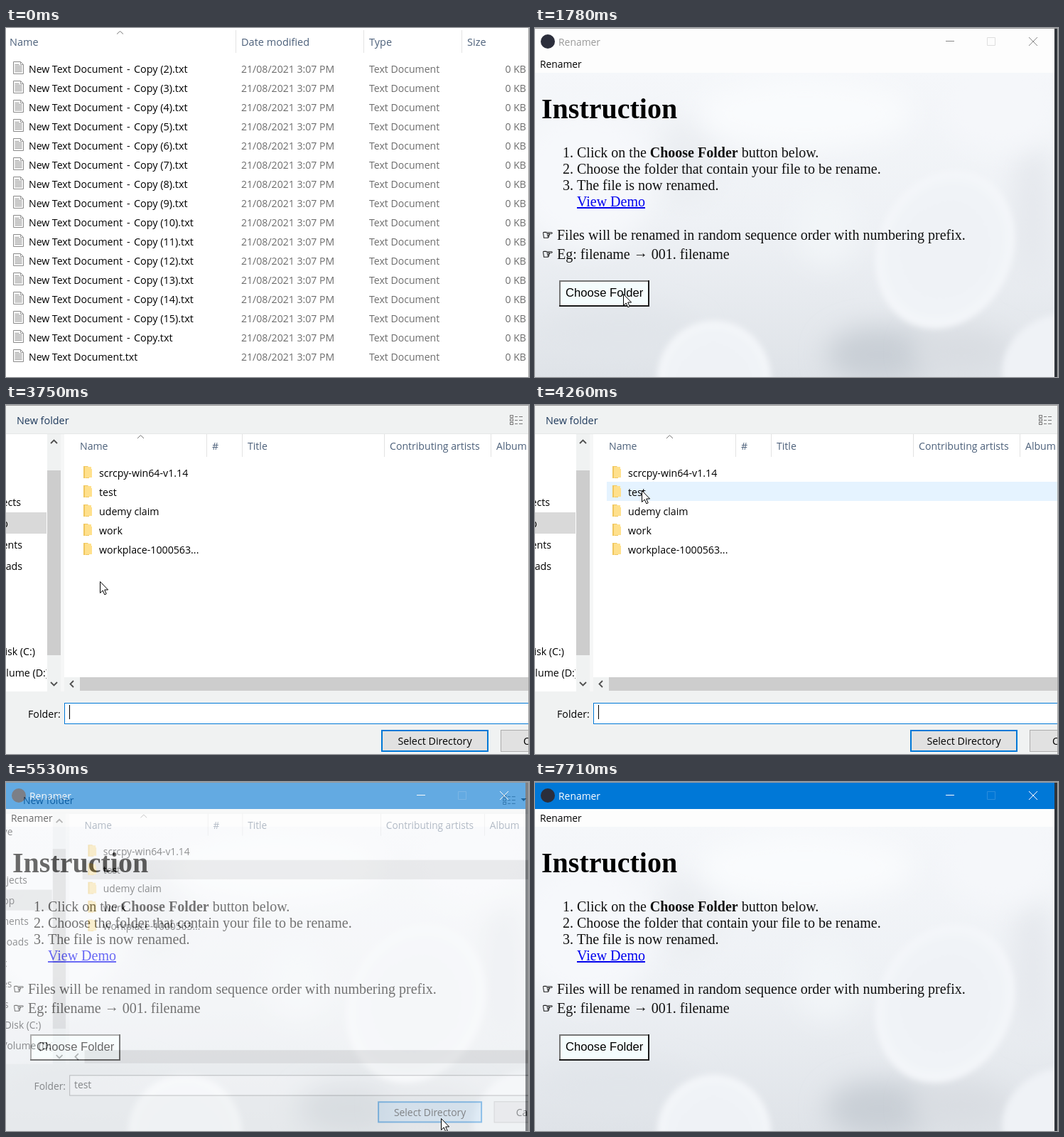
An HTML page for the animation above (8000 ms loop, 736 by 491 pixels).

```html
<!DOCTYPE html>
<html lang="en">
<head>
<meta charset="utf-8">
<title>Renamer</title>
<style>
html, body { margin: 0; width: 100%; height: 100%; overflow: hidden; background: #fff; }
svg { display: block; width: 736px; height: 491px; }
text { white-space: pre; }
.ui { font-family: "Open Sans", "Noto Sans", sans-serif; }
.serif { font-family: "Liberation Serif", serif; }
.sans { font-family: "Liberation Sans", sans-serif; }
.sym { font-family: "DejaVu Sans", sans-serif; }
#box .shade { filter: drop-shadow(0 5px 9px rgba(0,0,0,.5)); }
</style>
</head>
<body>
<svg id="stage" viewBox="0 0 736 491" xmlns="http://www.w3.org/2000/svg">
  <defs>
    <linearGradient id="sky" x1="0" y1="0" x2="0" y2="1">
      <stop offset="0" stop-color="#f5f7fa"/>
      <stop offset=".5" stop-color="#eef1f5"/>
      <stop offset="1" stop-color="#dfe3e8"/>
    </linearGradient>
    <radialGradient id="orb">
      <stop offset="0" stop-color="#eff2f6"/>
      <stop offset=".8" stop-color="#f0f3f7"/>
      <stop offset="1" stop-color="#f5f7fa"/>
    </radialGradient>
    <filter id="soft" x="-50%" y="-50%" width="200%" height="200%"><feGaussianBlur stdDeviation="18"/></filter>
    <filter id="edge" x="-20%" y="-20%" width="140%" height="140%"><feGaussianBlur stdDeviation="4"/></filter>
    <clipPath id="page"><rect y="63" width="732" height="428"/></clipPath>
    <clipPath id="nav"><rect x="-100" y="41" width="157" height="362"/></clipPath>
  </defs>
  <g id="list"></g>
  <g id="app"></g>
  <g id="dialog"></g>
  <g id="box"></g>
  <g id="frame"></g>
  <path id="cursor" d="M.5 .5V16.5L4.2 13L6.8 18.8L9.2 17.7L6.7 12H11.6Z" fill="#fff" stroke="#000"/>
</svg>
<script>
const $ = id => document.getElementById(id);
const HEAD = '#4c607a', BLUE = '#0078d7';

const text = (x, y, s, o = {}) =>
  `<text class="${o.font || 'ui'}" x="${x}" y="${y}" font-size="${o.size || 14.3}" fill="${o.fill || '#000'}" ${o.more || ''}>${s}</text>`;
const rect = (x, y, w, h, fill, more = '') =>
  `<rect x="${x}" y="${y}" width="${w}" height="${h}" fill="${fill}" ${more}/>`;
const line = (d, stroke, more = '') => `<path d="${d}" fill="none" stroke="${stroke}" ${more}/>`;
const oval = (x, y, rx, ry, fill, more = '') =>
  `<ellipse cx="${x}" cy="${y}" rx="${rx}" ry="${ry}" fill="${fill}" ${more}/>`;
const END = 'text-anchor="end"', MID = 'text-anchor="middle"';

function drawList() {
  const copies = [];
  for (let n = 2; n <= 15; n++) copies.push(`Copy (${n}).txt`);
  copies.push('Copy.txt', '');
  let s = rect(0, 0, 736, 491, '#fff');
  [323, 503, 641].forEach(x => s += rect(x, 3, 1, 32, '#e3e3e3'));
  s += line('M156 8.5L160.5 4.5L165 8.5', '#777');
  [[5, 'Name'], [331, 'Date modified'], [511, 'Type'], [649, 'Size']]
    .forEach(([x, h]) => s += text(x, 25, h, { fill: HEAD, size: 14.5 }));
  const grey = { fill: '#6d6d6d', size: 14.1 };
  copies.forEach((c, i) => {
    const y = 27 * i, base = y + 63;
    s += `<g transform="translate(9 ${y + 47})">`
      + '<path d="M1.5 .5H11.5L15.5 4.5V17.5H1.5Z" fill="#fafafa" stroke="#8b8b8b"/>'
      + line('M11.5 .5V4.5H15.5M3.5 4.5H9.5M3.5 6.5H13.5M3.5 8.5H13.5M3.5 10.5H13.5M3.5 12.5H13.5M3.5 14.5H13.5', '#9a9a9a') + '</g>'
      + text(32, base, 'New Text Document' + (c ? '' : '.txt'), { size: 14.1 })
      + (c && text(170, base, '-') + text(180, base, c, { size: 14.4 }))
      + text(331, base, '21/08/2021 3:07 PM', grey)
      + text(511, base, 'Text Document', grey)
      + text(732, base, '0 KB', { ...grey, more: END });
  });
  $('list').innerHTML = s + rect(735, 0, 1, 491, '#a5a5a5');
}

function drawPhoto() {
  const soft = 'filter="url(#soft)"', edge = 'filter="url(#edge)"';
  return '<g clip-path="url(#page)">' + rect(0, 63, 732, 428, 'url(#sky)')
    + oval(485, 460, 75, 40, '#c9cfd6', soft)
    + oval(600, 455, 70, 35, '#d9dde2', soft)
    + oval(120, 430, 110, 35, '#e1e5ea', soft)
    + oval(700, 260, 28, 100, '#e5e8ed', soft)
    + oval(215, 190, 45, 60, '#ebeef2', soft)
    + oval(70, 210, 100, 100, '#f6f8fb', soft)
    + oval(380, 120, 150, 50, '#f9fbfd', soft)
    + oval(655, 115, 80, 60, '#f5f7fa', soft)
    + oval(410, 280, 45, 55, '#f2f5f8', soft)
    + oval(577, 312, 94, 114, 'url(#orb)', 'transform="rotate(25 577 312)" ' + edge)
    + oval(252, 494, 80, 82, 'url(#orb)', edge)
    + oval(735, 475, 80, 70, '#eff2f6', 'transform="rotate(-30 735 475)" ' + edge)
    + '</g>';
}

function drawApp() {
  const serif = { font: 'serif', size: 20, fill: '#111' };
  let s = rect(0, 0, 732, 491, '#fdfdfd') + drawPhoto()
    + '<rect id="bar" y="1" width="732" height="37"/>'
    + oval(18, 19, 10, 10, '#2b2e3b')
    + text(33, 25, 'Renamer', { size: 13.9, more: 'id="caption"' })
    + line('M578 18.5H590', '', 'class="ctl"') + line('M695 13L707 25M707 13L695 25', '', 'class="ctl"')
    + line('M636.5 13.5H647.5V24.5H636.5Z', '', 'id="max"')
    + text(7, 56, 'Renamer', { size: 13.8 })
    + text(9, 127, 'Instruction', { font: 'serif', size: 40, more: 'font-weight="bold"' });
  ['Click on the <tspan font-weight="bold">Choose Folder</tspan> button below.',
   'Choose the folder that contain your file to be rename.',
   'The file is now renamed.'].forEach((t, i) => {
    s += text(39, 182 + 23 * i, `${i + 1}.`, serif) + text(59, 182 + 23 * i, t, serif);
  });
  s += text(59, 251, 'View Demo', { ...serif, fill: '#00e', more: 'text-decoration="underline"' });
  ['Files will be renamed in random sequence order with numbering prefix.',
   'Eg: filename <tspan dy="-2">→</tspan><tspan dy="2"> 001. filename</tspan>'].forEach((t, i) => {
    s += text(10, 297 + 27 * i, '☞', { font: 'sym', size: 17.5, more: 'stroke="#000" stroke-width=".4"' })
      + text(31, 298 + 27 * i, t, serif);
  });
  s += rect(34, 355, 127, 37, '#f4fcfd')
    + line('M35 392V356H161', '#767676', 'stroke-width="2"')
    + line('M34 391H160V355', '#1a1a1a', 'stroke-width="2"')
    + text(43, 378, 'Choose Folder', { font: 'sans', size: 16.67 });
  $('app').innerHTML = s + rect(731, 1, 4, 490, '#30343a');
}

function drawDialog() {
  const head = { fill: HEAD, size: 14.1 };
  let s = rect(-60, -40, 860, 570, '#f0f2f2') + rect(-60, 41, 860, 362, '#fff')
    + rect(-60, 40, 860, 1, '#e6e8e8')
    + text(15, 27, 'New folder', { fill: '#1e395b', size: 14.4 });
  for (let i = 0; i < 3; i++) {
    s += rect(709.5, 14.5 + 5 * i, 4, 3, '#fff', 'stroke="#777"')
      + line(`M716 ${16.5 + 5 * i}H720M722 ${16.5 + 5 * i}H727`, '#777');
  }
  s += '<path d="M735 19H743L739 23Z" fill="#444"/>';

  s += '<g clip-path="url(#nav)">' + rect(-60, 151, 117, 30, '#d9d9d9');
  [['ve', 0, 72], ['3D Objects', 21, 142], ['Desktop', 3, 172], ['Documents', 23, 202], ['Downloads', 23, 232],
   ['Music', -8, 262], ['Pictures', -1, 292], ['Videos', -6, 322], ['Local Disk (C:)', 41, 352], ['New Volume (D:)', 60, 382]]
    .forEach(([t, x, y]) => s += text(x, y, t, { size: 14.2, more: END }));
  s += '</g>' + rect(58, 41, 19, 362, '#f0f2f2') + rect(58, 92, 19, 260, '#cdcdcd')
    + line('M63 54L67.5 49.5L72 54M63 390L67.5 394.5L72 390', '#505050', 'stroke-width="1.8"')
    + rect(77, 41, 5, 362, '#f6f7f7')
    + rect(82, 383, 718, 20, '#f0f2f2') + rect(104, 383, 696, 19, '#cdcdcd')
    + line('M95 388L90.5 392.5L95 397', '#505050', 'stroke-width="1.8"');

  [282, 332, 532, 682].forEach(x => s += rect(x, 41, 1, 32, '#e3e3e3'));
  s += line('M185 47L189.5 42.5L194 47', '#777');
  [[104, 'Name'], [290, '#'], [340, 'Title'], [540, 'Contributing artists'], [690, 'Album']]
    .forEach(([x, t]) => s += text(x, 63, t, head));
  s += '<rect id="hover" x="101" width="699" height="27" fill="#e5f3ff"/>'
    + '<rect id="pick" x="101.5" y="108.5" width="699" height="27"/>';
  ['scrcpy-win64-v1.14', 'test', 'udemy claim', 'work', 'workplace-1000563...'].forEach((t, i) => {
    const y = 27 * i;
    s += `<path d="M109 ${y + 86}H115L117 ${y + 88}V${y + 103}H109Z" fill="#f0c75e"/>`
      + `<path d="M111 ${y + 87}H120V${y + 90}H121V${y + 102}H113L111 ${y + 103}Z" fill="#ffe08c"/>`
      + text(131, y + 101, t, { size: 14.2 });
  });

  s += text(31, 440, 'Folder:', { size: 14.2 })
    + '<rect id="field" x="82.5" y="419.5" width="717" height="29" fill="#fff"/>'
    + text(89, 438, 'test', { more: 'id="typed"' })
    + rect(89, 422, 1, 20, '#000', 'id="caret"')
    + '<rect id="ok" x="529" y="458" width="149" height="29" stroke="#0078d7" stroke-width="2"/>'
    + text(603.5, 478, 'Select Directory', { more: MID })
    + rect(696.5, 457.5, 150, 30, '#e1e1e1', 'stroke="#adadad"') + text(728, 478, 'Cancel');
  $('dialog').innerHTML = s;
}

function drawBox() {
  const info = (x, y, r, size) => oval(x, y, r, r, BLUE, 'stroke="#1a4f80"')
    + text(x, y + size * .36, 'i', { size, fill: '#fff', more: MID });
  $('box').innerHTML = rect(135, 142, 454, 150, '#4a6f8f', 'class="shade"')
    + rect(136, 143, 452, 31, BLUE) + rect(136, 174, 452, 66, '#fff')
    + rect(136, 240, 452, 51, '#f0f0f0') + rect(136, 240, 452, 1, '#dfdfdf')
    + info(149, 158, 9, 14) + text(164, 164, 'Renamer', { size: 13.9, fill: '#fff' })
    + line('M561 152L573 164M573 152L561 164', '#fff', 'stroke-width="1.2"')
    + info(169, 207, 19, 28) + text(202, 209, 'Rename successfully.', { size: 13.9 })
    + '<rect id="yes" x="490" y="253" width="83" height="25" stroke="#0078d7" stroke-width="2"/>'
    + text(531, 271, 'OK', { more: MID });
}

drawList(); drawApp(); drawDialog(); drawBox();
$('frame').innerHTML = rect(0, 0, 736, 1, '#9a9a9a') + rect(735, 0, 1, 491, '#a5a5a5');

// The screen refreshes only at these moments.
const TICKS = [0, 500, 1150, 1270, 1390, 1510, 1660, 1780, 2210, 2330, 2760, 2910, 3190, 3750, 3870, 3990, 4110,
  4260, 4420, 4570, 4690, 4840, 4990, 5110, 5230, 5380, 5530, 5650, 5770, 5920, 6070, 6190, 6340, 6590, 6740,
  6860, 7010, 7440, 7560, 7710];
// Pointer path: time, x, y
const PATH = [[1150, 369, 463], [1390, 235, 378], [1510, 175, 348], [1660, 140, 362], [1780, 124, 374],
  [3700, 124, 374], [3750, 132, 248], [4110, 149, 126], [4260, 150, 120], [4420, 150, 120], [4570, 205, 138],
  [4690, 330, 176], [4840, 606, 480], [5230, 612, 473], [5770, 612, 473], [5920, 608, 472], [6190, 494, 310],
  [6340, 469, 248], [6590, 486, 253], [6860, 515, 258], [7010, 516, 259]];

function pointer(t) {
  const i = PATH.findIndex(p => p[0] > t);
  if (i < 0) return PATH[PATH.length - 1].slice(1);
  if (i === 0) return PATH[0].slice(1);
  const a = PATH[i - 1], b = PATH[i], k = (t - a[0]) / (b[0] - a[0]);
  return [a[1] + (b[1] - a[1]) * k, a[2] + (b[2] - a[2]) * k];
}
const set = (el, o) => { for (const k in o) el.setAttribute(k, o[k]); };
const show = (id, on) => set($(id), { visibility: on ? 'inherit' : 'hidden' });
const within = (t, a, b) => t >= a && t < b;

function windowAt(id, alpha, scale, cx, cy) {
  show(id, alpha > 0);
  set($(id), { opacity: alpha, transform: `translate(${cx} ${cy}) scale(${scale}) translate(${-cx} ${-cy})` });
}

function render(now) {
  const t = TICKS.filter(v => v <= now).pop();
  const [x, y] = pointer(t);
  show('list', t < 500);
  show('app', t >= 500);
  show('frame', t >= 500);
  show('cursor', within(t, 1150, 7440));
  set($('cursor'), { transform: `translate(${Math.round(x)} ${Math.round(y)})` });

  const active = within(t, 2210, 2910) || within(t, 5530, 5770) || t >= 7440;
  set($('bar'), { fill: active ? BLUE : '#fdfdfd' });
  set($('caption'), { fill: active ? '#fff' : '#999' });
  document.querySelectorAll('.ctl').forEach(c => set(c, { stroke: active ? '#fff' : '#888' }));
  set($('max'), { stroke: active ? '#2b8ddd' : '#dedede' });

  let alpha = within(t, 2760, 5530) ? 1 : 0, scale = 1;
  if (t === 2760) [alpha, scale] = [.6, .96];
  if (t === 5530) [alpha, scale] = [.41, .973];
  if (t === 5650) [alpha, scale] = [.1, .94];
  windowAt('dialog', alpha, scale, 348, 171);

  const row = Math.floor((y - 81) / 27);
  show('hover', within(t, 3750, 4840) && row >= 0 && row < 5);
  set($('hover'), { y: 81 + 27 * row });
  show('pick', t >= 4420);
  set($('pick'), t < 5380 ? { fill: '#cce8ff', stroke: '#99d1ff' } : { fill: '#d9d9d9', stroke: '#d9d9d9' });
  show('typed', t >= 4420);
  show('caret', t < 3190 || within(t, 3750, 4420));
  const g = Math.round(23 + 99 * Math.min(1, Math.max(0, (t - 4840) / 390)));
  set($('field'), { stroke: t < 4570 ? BLUE : t < 4840 ? '#7a7a7a' : `rgb(${g},${g},${g})` });
  set($('ok'), { fill: t < 4990 ? '#e1e1e1' : t < 5380 ? '#e5f1fb' : '#cce4f7' });

  alpha = within(t, 5920, 7440) ? 1 : 0;
  scale = 1;
  if (t === 7440) [alpha, scale] = [.5, .97];
  if (t === 7560) [alpha, scale] = [.12, .95];
  windowAt('box', alpha, scale, 362, 217);
  set($('yes'), { fill: t < 6740 ? '#e1e1e1' : t < 7440 ? '#e5f1fb' : '#cce4f7' });
}

const start = performance.now();
function loop() {
  render((performance.now() - start) % 8000);
  requestAnimationFrame(loop);
}
loop();
</script>
</body>
</html>
```
